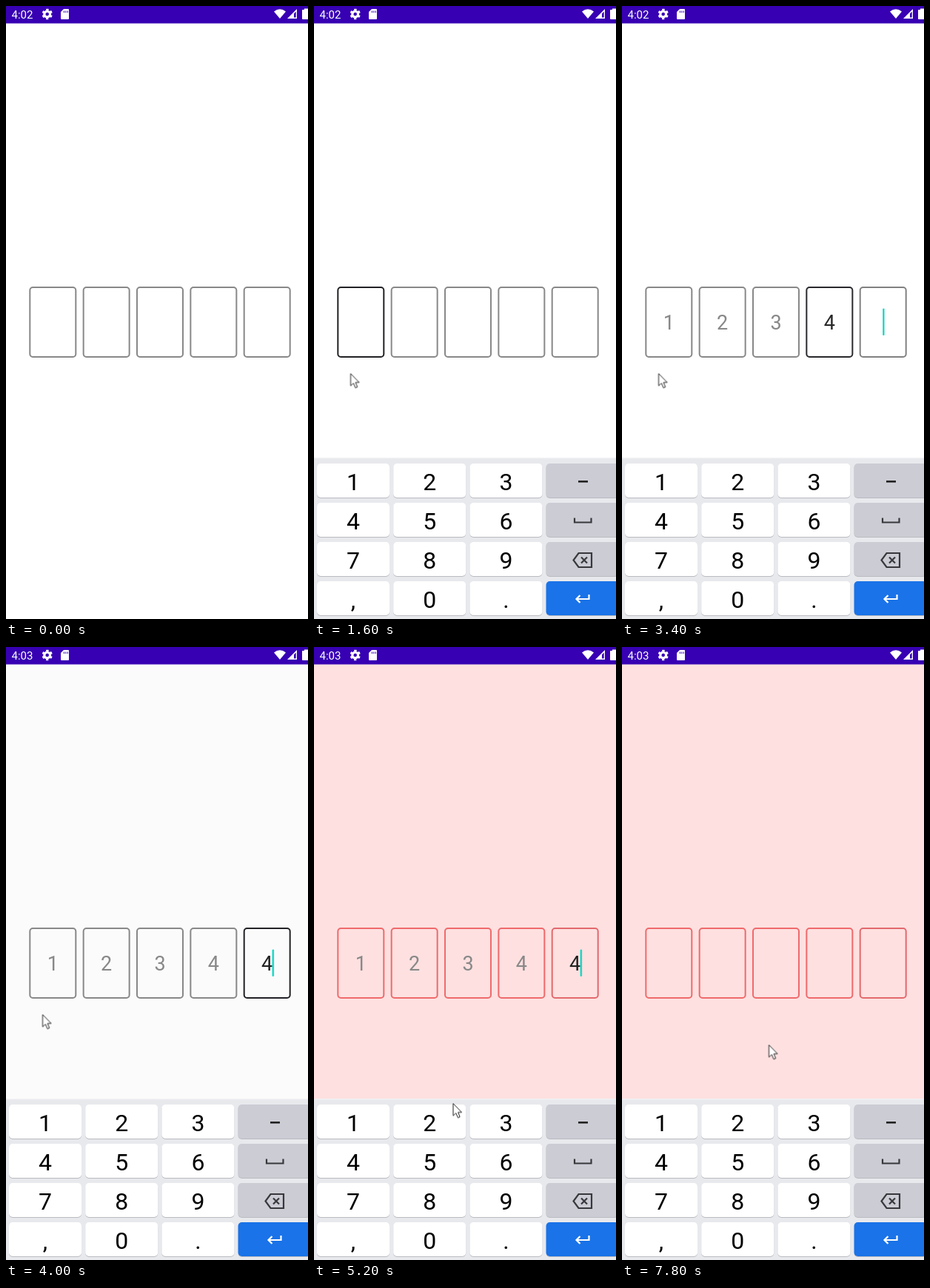
An HTML page for the animation above (8000 ms loop, 408 by 828 pixels).

```html
<!DOCTYPE html>
<html lang="en">
<head>
<meta charset="utf-8">
<title>Code entry</title>
<style>
  html, body { margin: 0; width: 100%; height: 100%; overflow: hidden; background: #fff; }
  svg { display: block; width: 408px; height: 828px; }
  text { font-family: Roboto, Arial, sans-serif; }
  .clock { font-size: 15px; fill: #fff; }
  .digit { font-size: 27px; text-anchor: middle; }
  .label { font-size: 32px; text-anchor: middle; fill: #000; }
  .box { fill: none; stroke-width: 2; }
  .icon { fill: none; stroke: #38383c; stroke-width: 2.2; }
</style>
</head>
<body>
<svg viewBox="0 0 408 828">
  <rect id="page" width="408" height="828" fill="#fff"/>

  <g id="status" fill="#fff">
    <rect width="408" height="23.5" fill="#3700b3"/>
    <text id="before" class="clock" x="7.5" y="17">4:02</text>
    <text id="after" class="clock" x="7.5" y="17">4:03</text>
    <g transform="translate(55.7 11) rotate(15)" fill="none" stroke="#fff">
      <circle r="3.9" stroke-width="3.2"/>
      <circle r="5.8" stroke-width="2.8" pathLength="12" stroke-dasharray="1 1"/>
    </g>
    <path d="M78 4h6a1 1 0 0 1 1 1v12a1 1 0 0 1-1 1h-9a1 1 0 0 1-1-1V8z"/>
    <path d="M78.4 6.5v2.6M80.8 6.5v2.6M83.2 6.5v2.6" stroke="#3700b3"/>
    <path d="M362 7.5Q370 1 378 7.5L370 17z"/>
    <path d="M393 4v13h-13z"/>
    <path d="M389 10.3l2.7-2.7v8H389z" fill="#3700b3"/>
    <path d="M400 6a1 1 0 0 1 1-1h2V3.5h5V18h-7a1 1 0 0 1-1-1z"/>
  </g>

  <g id="boxes"></g>
  <rect id="caret" x="-1" y="408.5" width="2.2" height="36.5" rx="1" fill="#03d5c0"/>

  <g id="keyboard">
    <rect y="610" width="408" height="2" fill="#f1f1f4"/>
    <rect y="611.5" width="408" height="217" fill="#e8e9ed"/>
    <g id="keys"></g>
    <rect x="357" y="641" width="13" height="2.6" fill="#222"/>
    <path class="icon" d="M352 691.5v6h22.500v-6"/>
    <path class="icon" d="M357.500 739h17.500v19h-17.500l-7-9.500zM361 744.500l8 8m0-8l-8 8"/>
    <path class="icon" d="M371.500 795v6h-17m5-5l-5 5l5 5" style="stroke:#fff"/>
  </g>

  <g id="mouse">
    <path d="M0 0V16.500l3.800-3.500 2.700 6.300 2.700-1.200-2.600-6.100h5z" fill="#fff" stroke="#222" stroke-linejoin="round"/>
  </g>
</svg>

<script>
const LOOP = 8000;
const IDLE = '#888888', FOCUS = '#222226', INK = '#212121', ERROR = '#ef6a6c';
const sheet = document.head.appendChild(document.createElement('style'));
const $ = id => document.getElementById(id);
let count = 0;

function add(parent, tag, attrs, text = '') {
  const el = document.createElementNS('http://www.w3.org/2000/svg', tag);
  for (const name in attrs) el.setAttribute(name, attrs[name]);
  el.textContent = text;
  return parent.appendChild(el);
}

// Builds a looping CSS animation from [ms, value] pairs.
function track(el, prop, steps, timing) {
  const name = 'track' + count++;
  const all = [...steps, [LOOP, steps[steps.length - 1][1]]];
  const frames = all.map(([ms, value]) => `${ms / LOOP * 100}%{${prop}:${value}}`).join('');
  sheet.append(`@keyframes ${name}{${frames}}\n`);
  const own = `${name} ${LOOP}ms ${timing} infinite`;
  el.style.animation = el.style.animation ? `${el.style.animation}, ${own}` : own;
}
const tween = (el, prop, steps, timing = 'linear') => track(el, prop, steps, timing);
const cut = (el, prop, steps) => track(el, prop, steps, 'step-end');
const at = (x, y) => `translate(${x}px,${y}px)`;

// Code boxes: each one darkens on focus, then all turn red.
const typed = [2170, 2590, 2970, 3380, 3850];
const focused = [980, ...typed];
const cleared = i => 7280 - 200 * i;
const centre = i => 63.3 + 72.35 * i;
const values = '12344';

[...values].forEach((value, i) => {
  const last = i === values.length - 1;
  const box = add($('boxes'), 'rect', {
    class: 'box', x: centre(i) - 31, y: 380, width: 62, height: 94, rx: 4
  });
  const stroke = [[0, IDLE], [focused[i], IDLE], [focused[i] + 300, FOCUS]];
  if (last) stroke.push([4020, FOCUS], [4100, '#4c4048'], [4600, '#e2696d']);
  else stroke.push([typed[i], FOCUS], [typed[i] + 300, IDLE], [4000, IDLE], [4100, '#aa7c80'], [4600, ERROR]);
  tween(box, 'stroke', stroke);

  const digit = add($('boxes'), 'text', { class: 'digit', x: centre(i), y: 437, fill: INK }, value);
  cut(digit, 'opacity', [[0, 0], [typed[i], 1], [cleared(i), 0]]);
  if (!last) {
    const back = cleared(i + 1);
    tween(digit, 'fill', [[0, INK], [typed[i], INK], [typed[i] + 300, IDLE], [back, IDLE], [back + 150, INK]]);
  }
});

// Caret: box by box, behind the digit where there is one.
const caretAt = (i, filled) => at(centre(i) + (filled ? 8 : 0.6), 0);
cut($('caret'), 'transform', [
  [0, caretAt(0)],
  ...[0, 1, 2, 3].map(i => [typed[i], caretAt(i + 1)]),
  [typed[4], caretAt(4, true)],
  ...[3, 2, 1, 0].map(i => [cleared(i + 1), caretAt(i, true)]),
  [cleared(0), caretAt(0)]
]);
cut($('caret'), 'opacity', [
  [0, 0], [980, 1], [1570, 0], [1970, 1], [4470, 0], [4970, 1], [5470, 0], [5970, 1], [7760, 0]
]);

// Keyboard
const labels = ['123', '456', '789', ',0.'];
labels.forEach((row, r) => {
  const y = 618 + 53 * r;
  for (let c = 0; c < 4; c++) {
    const x = 4 + 103.2 * c;
    const fill = c < 3 ? '#fff' : r < 3 ? '#cbccd4' : '#1a73e8';
    const shape = { x, y, width: 98, height: 46, rx: 5 };
    add($('keys'), 'rect', { ...shape, y: y + 1, fill: '#babbc0' });
    const key = add($('keys'), 'rect', { ...shape, fill });
    if (c < 3) add($('keys'), 'text', { class: 'label', x: x + 49, y: y + 36 }, row[c]);
    else if (r === 2) tween(key, 'fill', [
      [0, fill], [5980, fill], [6180, '#b8bac1'], [7080, '#b8bac1'], [7200, fill]
    ]);
  }
});
tween($('keyboard'), 'transform', [[0, at(0, 219)], [1050, at(0, 219)], [1370, at(0, 0)]],
  'cubic-bezier(.333,.667,.667,1)');
tween($('keyboard'), 'opacity', [[0, 0.6], [1050, 0.6], [1300, 1]]);

// Page colour and clock
tween($('page'), 'fill', [
  [0, '#ffffff'], [3930, '#ffffff'], [4000, '#fbfbfb'], [4100, '#fde7e5'], [4600, '#fee0e0']
]);
cut($('before'), 'opacity', [[0, 1], [3480, 0]]);
cut($('after'), 'opacity', [[0, 0], [3480, 1]]);

// Mouse pointer
cut($('mouse'), 'opacity', [[0, 0], [80, 1]]);
tween($('mouse'), 'transform', [
  [0, at(368, 788)], [80, at(368, 788)], [300, at(200, 590)], [520, at(44, 446)],
  [700, at(55.5, 466.5)], [1200, at(55.5, 466.5)], [1400, at(49.5, 496.5)],
  [4950, at(49.5, 496.5)], [5250, at(215, 640)], [5600, at(353, 748.5)],
  [7550, at(353, 748.5)], [7790, at(198.5, 537.5)]
]);
</script>
</body>
</html>
```
